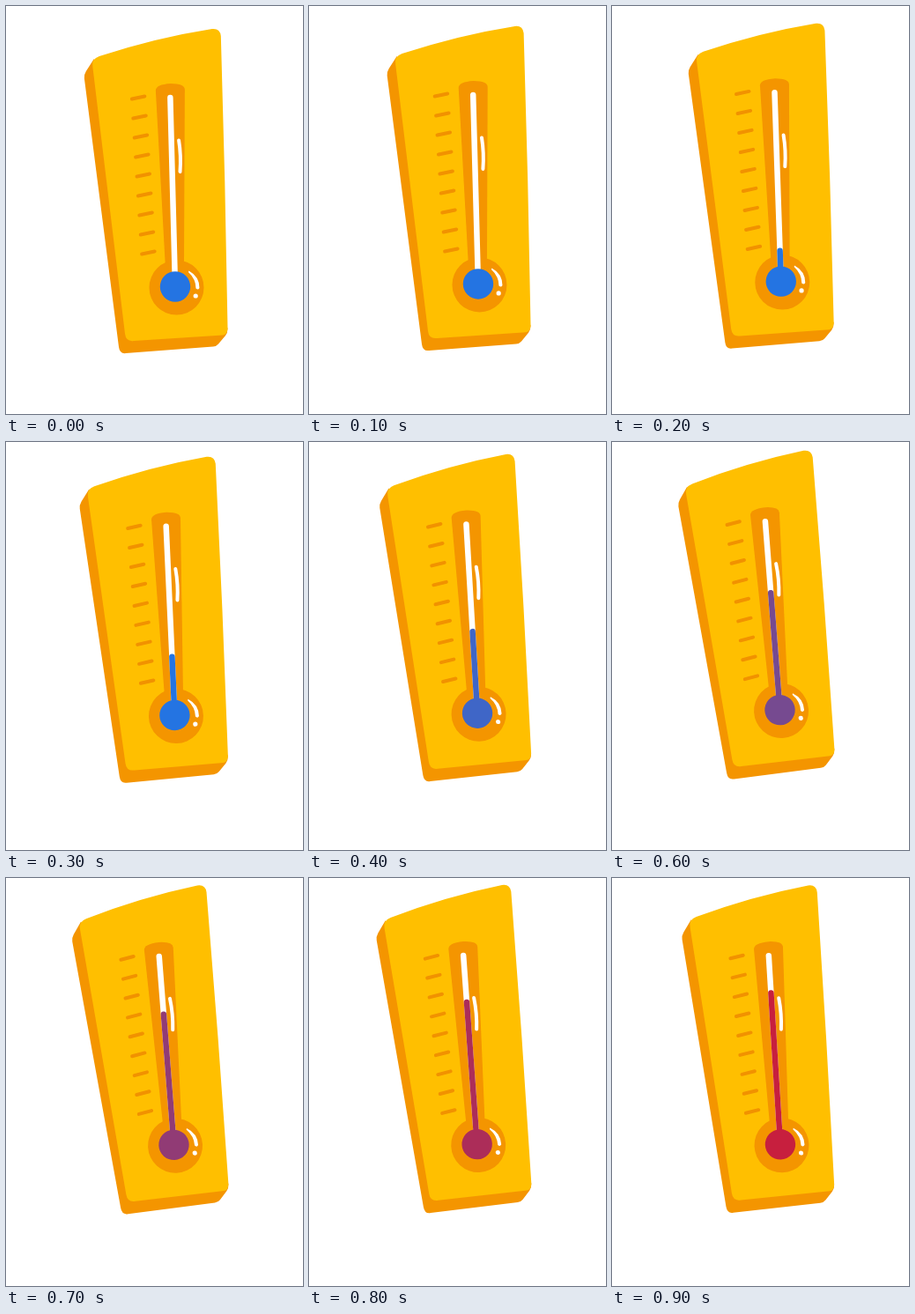
Write an HTML page that moves like this. It is 337 by 463 pixels and loops after 1 s.

```html
<!DOCTYPE html>
<html lang="en">
<head>
<meta charset="utf-8">
<title>Thermometer</title>
<style>
  html, body { margin: 0; height: 100%; overflow: hidden; background: #fff; }
  svg { display: block; width: 100%; height: 100%; }
  .shade { fill: #f49500; }
  .face { fill: #ffbf00; }
  .light { fill: #fff; }
  .line { fill: none; stroke: #fff; stroke-width: 6.5; stroke-linecap: round; }
</style>
</head>
<body>
<svg viewBox="0 0 337 463">
  <g id="body">
    <path class="shade" d="M100 60 L91 74 Q88.500 78 89 82 L128 387 Q129 395 136 394 L235 386.500 Q239 386 241 383.500 L249 374 Q251.500 371 251.500 366 L180 200Z"/>
    <path class="face" d="M98.500 69 Q97 60 106 57 Q170 36 234 26 Q243 25 244 34 Q249 200 251.500 366 Q251 373 246 373.500 L145 380 Q136 381 135 372Z"/>
    <path id="ticks" class="line" style="stroke: #f19200; stroke-width: 4"/>
    <path class="shade" d="M170 96 Q170 89 187 88 Q203 88 203 95 L202 298 L181 298Z"/>
    <circle class="shade" cx="193.500" cy="319.500" r="31"/>
    <path class="line" d="M186.500 104 L192 318.500"/>
    <path class="line" style="stroke-width: 4" d="M196.200 152.500 Q199 170 197.600 188"/>
    <path class="light" d="M207.500 300.500 Q219.500 307 219.500 320 Q218 323 215.500 320.500 Q215.500 310 207 302Z"/>
    <circle class="light" cx="215.200" cy="329" r="2.600"/>
    <path id="fluid" class="line"/>
    <circle id="bulb" cx="192" cy="318.500" r="17.200"/>
  </g>
</svg>
<script>
const el = id => document.getElementById(id);
const body = el('body'), fluid = el('fluid'), bulb = el('bulb');
const cold = [36, 116, 226], hot = [199, 31, 62];

let marks = '';
for (let i = 0; i < 9; i++) marks += `M${143 + i * 1.4} ${105.5 + i * 22}l14.5 -3`;
el('ticks').setAttribute('d', marks);

function draw(time) {
  const step = Math.floor(time % 1000 / 100);

  // Lean left and back again while rising and settling
  const tilt = -1.52 * (1 - Math.cos(Math.PI * (step - 0.4) / 6.2));
  const x = 192 + tilt / 2;
  const y = 302 + 16.5 * Math.abs(1 - step / 8.3) ** 1.6;
  body.setAttribute('transform', `translate(${x} ${y}) rotate(${tilt}) translate(-192 -318.5)`);

  // The fluid climbs ever slower along the tube, from cold to hot
  const rise = Math.max(0, 1.07 * (1 - Math.exp(-0.18 * (step - 1))) - 0.014);
  const heat = Math.max(0, (step - 3) / 6);
  const color = `rgb(${cold.map((c, i) => Math.round(c + (hot[i] - c) * heat))})`;
  fluid.setAttribute('d', `M192 318.5l${-5.5 * rise} ${-214.5 * rise}`);
  fluid.style.stroke = bulb.style.fill = color;
}

const start = performance.now();
function loop() {
  draw(performance.now() - start);
  requestAnimationFrame(loop);
}
loop();
</script>
</body>
</html>
```
